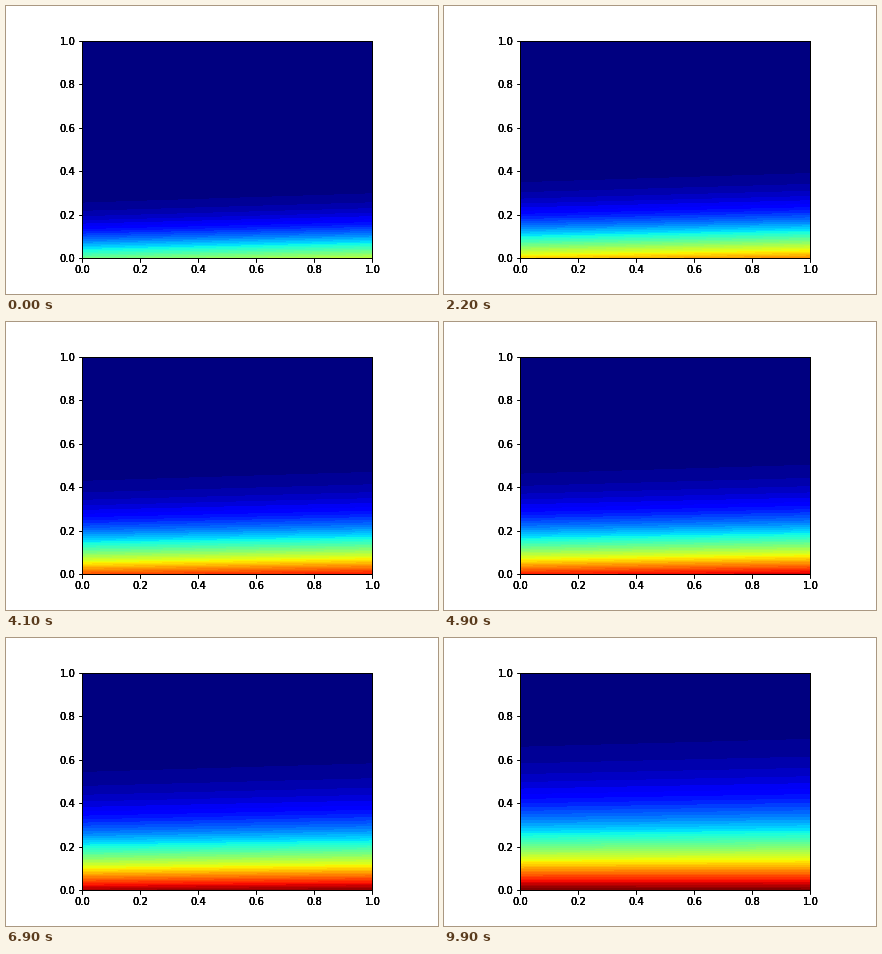
These frames come from a looping animation (432x288 px, 10000 ms). A matplotlib script:

```python
import math

import matplotlib.pyplot as plt
import numpy as np
from matplotlib.animation import FuncAnimation

FRAMES = 100
INTERVAL = 100
BANDS = 50
LAYERS = 4  # stacked axes give the heavy tick labels

plt.rcParams.update({"font.family": "DejaVu Sans", "font.size": 10})

fig = plt.figure(figsize=(6, 4), dpi=72, facecolor="white")
fig.subplots_adjust(left=0.125, right=0.9, bottom=0.125, top=0.88)


def make_axes(zorder):
    ax = fig.add_subplot(111, label=f"layer{zorder}", zorder=zorder)
    ax.set_xlim(0, 1)
    ax.set_ylim(0, 1)
    ax.set_aspect(0.75)
    ticks = np.linspace(0, 1, 6)
    ax.set_xticks(ticks)
    ax.set_yticks(ticks)
    ax.patch.set_visible(zorder == 0)
    return ax


axes = [make_axes(k) for k in range(LAYERS)]
ax = axes[0]

x = np.linspace(0, 1, 21)
y = np.linspace(0, 1, 161)
X, Y = np.meshgrid(x, y)
levels = np.linspace(0, 1, BANDS + 1)
colors = plt.get_cmap("jet")(np.linspace(0, 1, BANDS))
erfc = np.vectorize(math.erfc, otypes=[float])

drawn = []


def heat(frame):
    """Heat diffusing up from a base that warms sinusoidally, leading on the right."""
    phase = frame + 10 * X
    base = np.sin(0.5 + 0.011 * phase)
    depth = 0.1754 + 0.00226 * phase
    return np.clip(base * erfc(Y / depth), 0, 0.9999)


def update(frame):
    while drawn:
        drawn.pop().remove()
    drawn.append(ax.contourf(X, Y, heat(frame), levels=levels, colors=colors))
    ax.set_xlim(0, 1)
    ax.set_ylim(0, 1)
    return drawn


anim = FuncAnimation(fig, update, frames=FRAMES, interval=INTERVAL,
                     init_func=lambda: update(0), repeat=True,
                     repeat_delay=0, blit=False)
plt.show()
```
